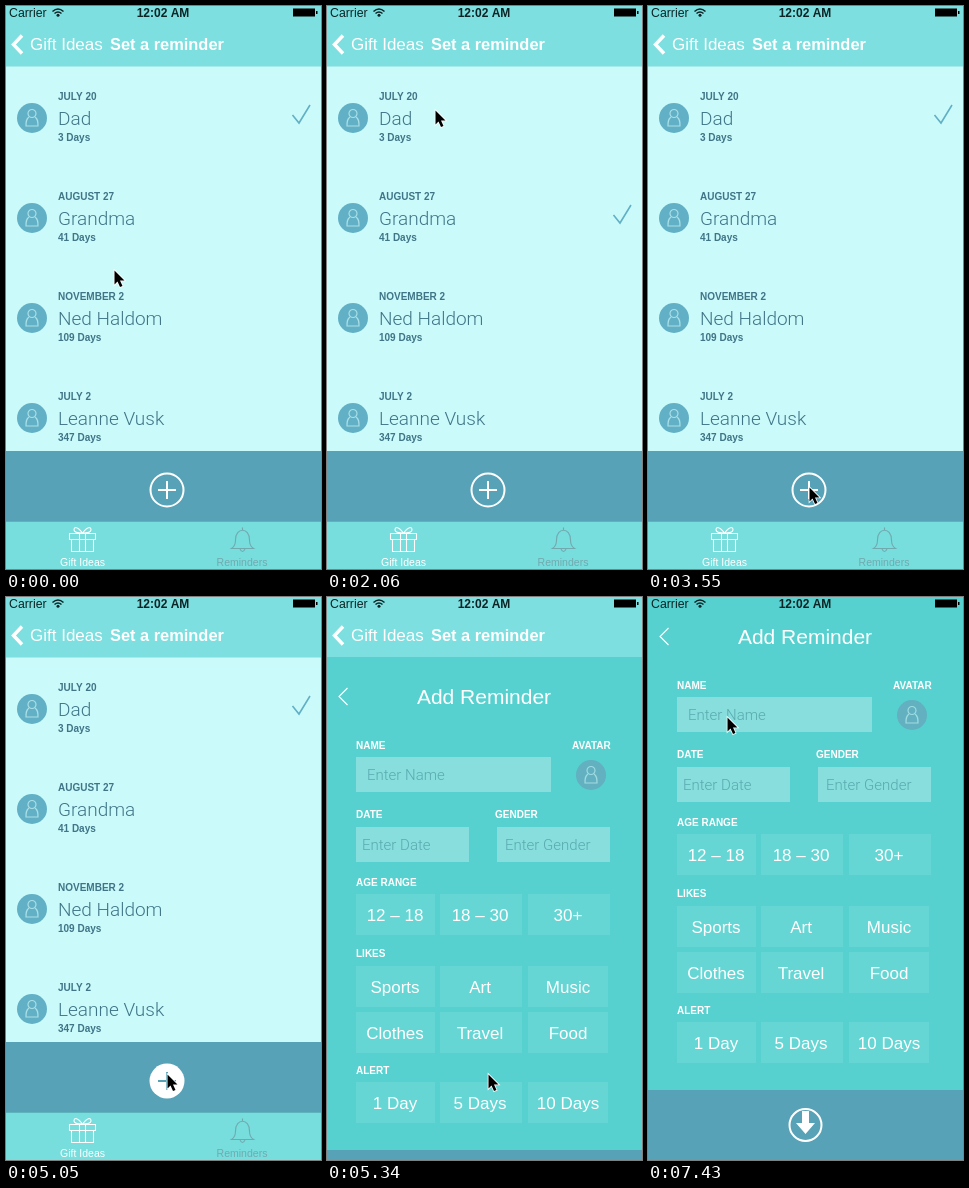
An HTML page with a canvas that plays this animation: 315x563 px, repeating every 8000 ms.

```html
<!DOCTYPE html>
<html lang="en">
<head>
<meta charset="utf-8">
<title>Reminders</title>
<style>
html, body { margin: 0; width: 100%; height: 100%; overflow: hidden; background: #cafafa; }
canvas { display: block; width: 315px; height: 563px; }
</style>
</head>
<body>
<canvas id="stage"></canvas>
<script>
const W = 315, H = 563, LOOP = 8000, STEP = 148.5;
const canvas = document.getElementById('stage');
const scale = window.devicePixelRatio || 1;
canvas.width = W * scale;
canvas.height = H * scale;
const ctx = canvas.getContext('2d');

const SANS = '"Liberation Sans", Arial, sans-serif';
const LIGHT = 'Roboto, "Liberation Sans", sans-serif';
const BAR = '#57a2b7', ACCENT = '#62b0c5', INK = '#3f7587', WHITE = '#fff';

const people = [
  ['JULY 20', 'Dad', '3 Days'],
  ['AUGUST 27', 'Grandma', '41 Days'],
  ['NOVEMBER 2', 'Ned Haldom', '109 Days'],
  ['JULY 2', 'Leanne Vusk', '347 Days']
];

// Pointer path: step, x, y
const path = [
  [0, 108, 264], [2, 112, 400], [8, 111, 400], [10, 111, 208], [13, 111, 208],
  [14, 108, 104], [15, 108, 109], [16, 108, 109], [18, 144, 394], [19, 144, 394],
  [21, 158, 480], [23, 161, 485], [25, 161, 477], [44, 161, 477], [50, 79, 120]
];

function text(str, x, y, font, color, align = 'left') {
  ctx.font = font;
  ctx.fillStyle = color;
  ctx.textAlign = align;
  ctx.fillText(str, x, y);
}

function rect(x, y, w, h, color) {
  ctx.fillStyle = color;
  ctx.fillRect(x, y, w, h);
}

function stroke(d, color, width) {
  ctx.strokeStyle = color;
  ctx.lineWidth = width;
  ctx.stroke(new Path2D(d));
}

function fill(d, color) {
  ctx.fillStyle = color;
  ctx.fill(new Path2D(d));
}

function circle(x, y, r, color, lineWidth) {
  ctx.beginPath();
  ctx.arc(x, y, r, 0, Math.PI * 2);
  if (lineWidth) {
    ctx.strokeStyle = color;
    ctx.lineWidth = lineWidth;
    ctx.stroke();
  } else {
    ctx.fillStyle = color;
    ctx.fill();
  }
}

function at(x, y, draw) {
  ctx.save();
  ctx.translate(x, y);
  draw();
  ctx.restore();
}

function avatar(x, y, color, line) {
  at(x, y, () => {
    circle(0, 0, 15, color);
    circle(0, -4.5, 4, line, 1.2);
    stroke('M-3 -1 C-6 1 -6 4 -6 8 H6 C6 4 6 1 3 -1', line, 1.2);
  });
}

function statusBar() {
  const ink = '#0c2426';
  text('Carrier', 3, 11, '12.3px ' + SANS, ink);
  text('12:02 AM', 157, 11, 'bold 12px ' + SANS, ink, 'center');
  stroke('M46.5 5.5 Q52 0.5 57.5 5.5 M48.5 7.5 Q52 4.5 55.5 7.5', ink, 1.5);
  circle(52, 9.3, 1.5, ink);
  rect(287, 2.5, 22, 8, '#000');
  rect(310, 5, 1.5, 3, '#000');
}

function personRow([date, name, days], y, checked, pressed) {
  if (pressed) rect(0, y, W, 100, '#b3e6ea');
  avatar(26, y + 52, ACCENT, '#a9dfe7');
  text(date, 52, y + 34, 'bold 10px ' + SANS, INK);
  text(name, 52, y + 59, '300 19px ' + LIGHT, INK);
  text(days, 52, y + 75, 'bold 10px ' + SANS, INK);
  if (checked) at(0, y, () => stroke('M286.5 49 L293 57 L304 39', ACCENT, 1.6));
}

function tabBar() {
  rect(0, 515, W, 48, '#77dddd');
  rect(0, 515, W, 1, '#5cb5bd');
  stroke('M63.5 527.5 h26 v6 h-26 z M65.5 533.5 v12 h22 v-12 M73.5 527 v18 M79.5 527 v18' +
    'M76.5 527 C72 521 68 520 68 524 Q68 527 76.5 527 C81 521 85 520 85 524 Q85 527 76.5 527', WHITE, 1.1);
  text('Gift Ideas', 76.5, 560, '10.5px ' + SANS, WHITE, 'center');
  const muted = '#71aaae';
  stroke('M225.5 542.5 H247.5 Q243.5 540 243.5 534 C243.5 521 229.5 521 229.5 534 Q229.5 540 225.5 542.5 Z' +
    'M234 543 Q236.5 548 239 543 M236.5 524 V521.5', muted, 1.1);
  text('Reminders', 236, 560, '10.5px ' + SANS, muted, 'center');
}

function listScreen(step) {
  rect(0, 0, W, H, '#cafafa');
  const checked = step < 4 ? 0 : step < 10 ? 3 : step < 13 ? -1 : step < 16 ? 1 : 0;
  const pressed = { 3: 3, 4: 3, 12: 1, 15: 0 }[step];
  people.forEach((p, i) => personRow(p, 60 + 100 * i, i === checked, i === pressed));

  rect(0, 0, W, 60, '#7ddfdf');
  rect(0, 60, W, 1, '#a5ebeb');
  stroke('M16 29.5 L7.5 38.5 L16 47.5', WHITE, 3.5);
  text('Gift Ideas', 24, 44, '17px ' + SANS, WHITE);
  text('Set a reminder', 104, 44, 'bold 16.4px ' + SANS, WHITE);

  rect(0, 445, W, 70, BAR);
  const active = step >= 34;
  circle(161, 484, active ? 17.5 : 16.5, WHITE, active ? 0 : 2);
  stroke('M152 484 H170 M161 475 V493', active ? BAR : WHITE, 2);
  tabBar();
}

function label(str, x, y) {
  text(str, x, y, 'bold 10px ' + SANS, WHITE);
}

function field(hint, x, y, w, textX) {
  rect(x, y, w, 35, '#87dedc');
  text(hint, textX, y + 23, '300 15px ' + LIGHT, '#5aa9ae');
}

function buttons(names, y, lastWidth) {
  const slots = [[29, 79, 68], [113, 82, 153], [201, lastWidth, 241]];
  slots.forEach(([x, w, center], i) => {
    rect(x, y, w, 41, '#66d6d4');
    text(names[i], center, y + 26.5, '17px ' + SANS, WHITE, 'center');
  });
}

function formScreen() {
  rect(0, 0, W, H, '#57d1cf');
  stroke('M20.5 31 L12 39.5 L20.5 48', WHITE, 1.1);
  text('Add Reminder', 157, 47, '21px ' + SANS, WHITE, 'center');
  label('NAME', 29, 92);
  label('AVATAR', 245, 92);
  field('Enter Name', 29, 100, 195, 40);
  avatar(264, 118, '#62b0c0', '#9fdce2');
  label('DATE', 29, 161);
  label('GENDER', 168, 161);
  field('Enter Date', 29, 170, 113, 35);
  field('Enter Gender', 170, 170, 113, 178);
  label('AGE RANGE', 29, 229);
  buttons(['12 – 18', '18 – 30', '30+'], 237, 82);
  label('LIKES', 29, 300);
  buttons(['Sports', 'Art', 'Music'], 309, 80);
  buttons(['Clothes', 'Travel', 'Food'], 355, 80);
  label('ALERT', 29, 417);
  buttons(['1 Day', '5 Days', '10 Days'], 425, 80);
  rect(0, 493, W, 70, BAR);
  circle(157.5, 528, 16, WHITE, 2);
  fill('M154 514 h7 v12 h6 L157.5 537 L148 526 h6 z', WHITE);
}

function pointer(step) {
  const next = path.findIndex(k => k[0] > step);
  let [, x, y] = path[path.length - 1];
  if (next > 0) {
    const [n0, x0, y0] = path[next - 1], [n1, x1, y1] = path[next];
    const p = (step - n0) / (n1 - n0);
    x = x0 + (x1 - x0) * p;
    y = y0 + (y1 - y0) * p;
  }
  at(x, y, () => {
    const arrow = 'M0.5 0.5 V14.5 L3.5 11.5 L6 17 L8.5 16 L6 10.5 H10.5 Z';
    stroke(arrow, WHITE, 1.6);
    fill(arrow, '#000');
  });
}

function draw() {
  const t = performance.now() % LOOP;
  const step = Math.floor((t + 19) / STEP);
  ctx.setTransform(scale, 0, 0, scale, 0, 0);
  listScreen(step);
  if (step > 34) at(0, Math.round(60 * 5 ** (36 - step)), formScreen);
  statusBar();
  pointer(step);
  requestAnimationFrame(draw);
}
draw();
</script>
</body>
</html>
```
